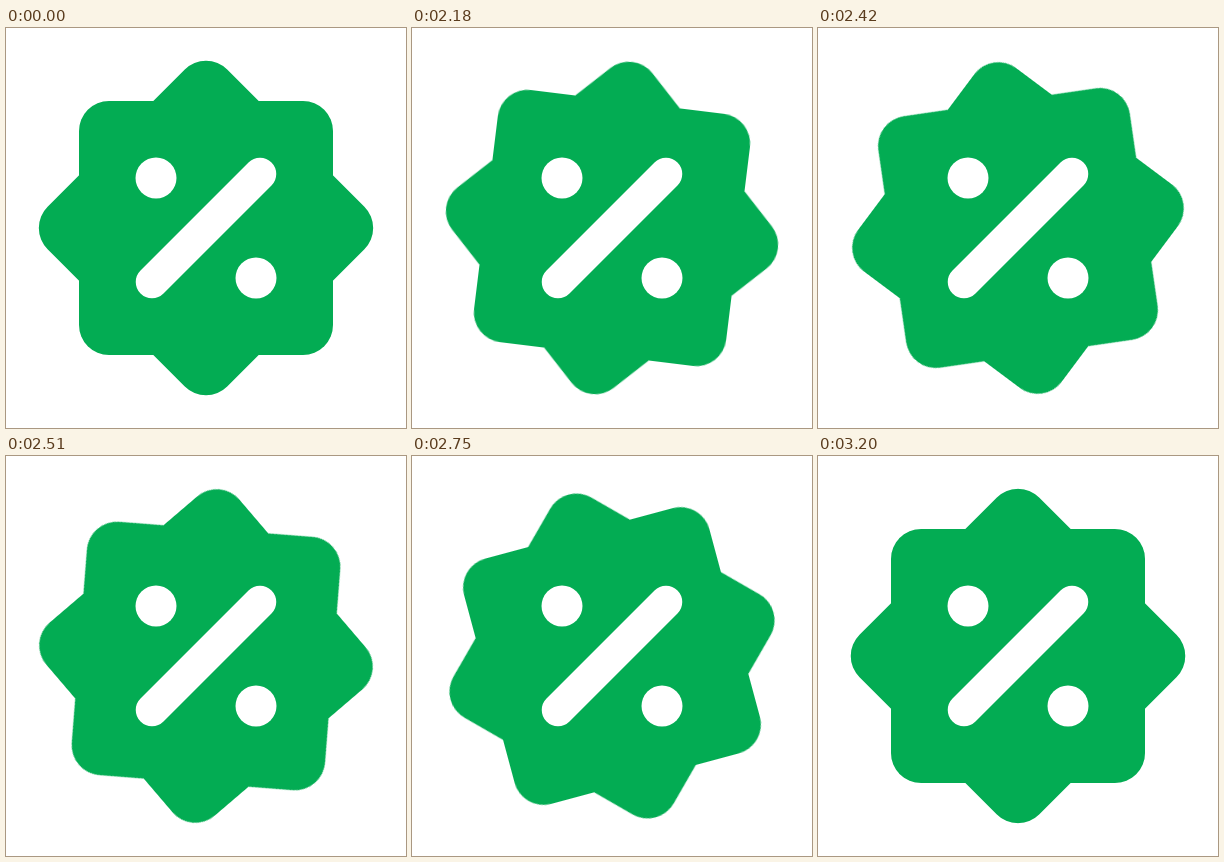
An HTML page without scripts that plays this animation: 400x400 px, repeating every 3260 ms.

```html
<!DOCTYPE html>
<html lang="en">
<head>
<meta charset="utf-8">
<title>Discount badge</title>
<style>
  html, body { margin: 0; height: 100%; overflow: hidden; background: #fff; }
  svg { display: block; width: 100%; height: 100%; }

  .badge {
    fill: #03ac53;
    transform-origin: 200px 200px;
    animation: turn 3260ms infinite;
  }

  /* Rest for 2000 ms, quarter turn in 1200 ms, short rest */
  @keyframes turn {
    0% { transform: rotate(0deg); }
    61.35% { transform: rotate(0deg); animation-timing-function: cubic-bezier(.33, 0, .4, 1); }
    98.16%, 100% { transform: rotate(90deg); }
  }

  .percent { fill: #fff; stroke: #fff; stroke-width: 0; }
  .percent path { stroke-width: 32.5; stroke-linecap: round; }
</style>
</head>
<body>
<svg viewBox="0 0 400 400">
  <g class="badge">
    <rect x="73" y="73" width="254" height="254" rx="30"/>
    <rect x="73" y="73" width="254" height="254" rx="30" transform="rotate(45 200 200)"/>
  </g>
  <g class="percent">
    <circle cx="150" cy="150" r="20.5"/>
    <circle cx="250" cy="250" r="20.5"/>
    <path d="M146 254L254 146"/>
  </g>
</svg>
</body>
</html>
```
